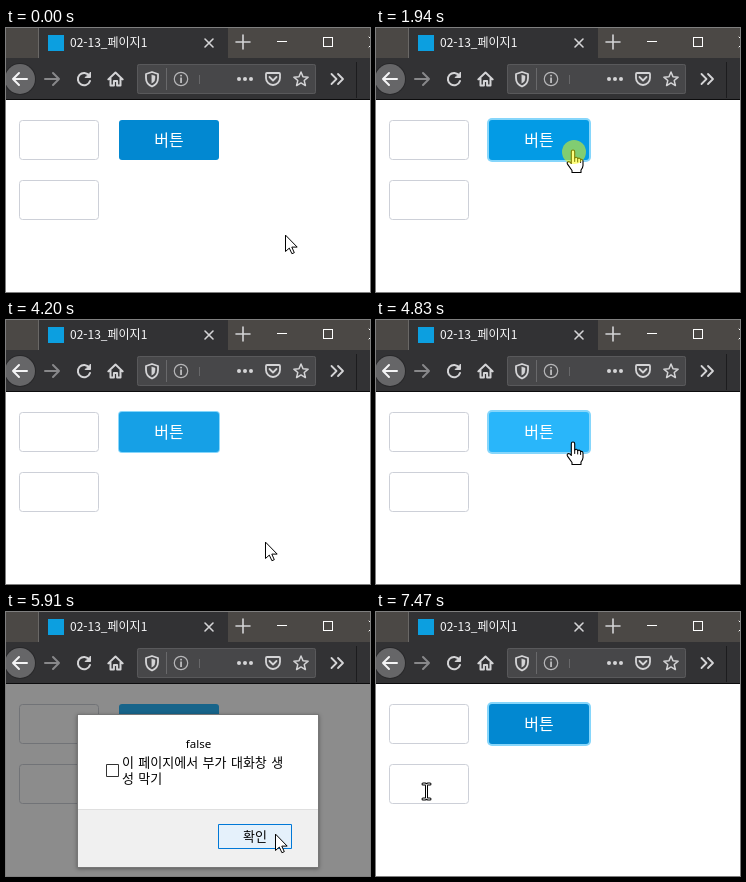
An HTML page with a canvas for the animation above (8 s loop, 364x264 px).

```html
<!DOCTYPE html>
<html lang="ko">
<head>
<meta charset="utf-8">
<style>
html, body { margin: 0; width: 100%; height: 100%; overflow: hidden; background: #fff; }
canvas { display: block; width: 364px; height: 264px; }
</style>
</head>
<body>
<canvas id="stage"></canvas>
<script>
const W = 364, H = 264, LOOP = 8000;
const canvas = document.getElementById('stage');
const dpr = window.devicePixelRatio || 1;
canvas.width = W * dpr;
canvas.height = H * dpr;
const c = canvas.getContext('2d');
const KR = '"Noto Sans CJK KR", "Noto Sans CJK", sans-serif';
const LATIN = '"Noto Sans", sans-serif';

const MOVES = [
  [1000, 1350, 279, 207, 197, 124],
  [2480, 2710, 197, 124, 259, 222],
  [4200, 4780, 259, 222, 197, 124],
  [5370, 5900, 197, 124, 269, 222],
  [7010, 7460, 269, 222, 50.5, 179.5]
];
const DIALOGS = [
  { from: 2020, to: 4130, press: 3960, x: 72, y: 105, w: 240, h: 144, foot: 190, bx: 211, by: 205, text: 153 },
  { from: 5290, to: 6940, press: 6770, x: 71, y: 102, w: 242, h: 154, foot: 197, bx: 212, by: 212, text: 136, extra: true }
];
const CLICKS = [[1870, 2020], [3960, 4130], [5140, 5290], [6770, 6940]];

const ramp = (t, a, b) => Math.max(0, Math.min(1, (t - a) / (b - a)));
const ease = u => u * u * (3 - 2 * u);
const within = (t, [a, b]) => t >= a && t < b;
const mix = (a, b, u) => a.map((v, i) => v + (b[i] - v) * u);
const rgb = a => `rgb(${a.map(Math.round)})`;
const inside = (p, x, y, w, h) => p.x >= x && p.x < x + w && p.y >= y && p.y < y + h;

function rect(x, y, w, h, color) {
  c.fillStyle = color;
  c.fillRect(x, y, w, h);
}
function box(x, y, w, h, r, fill, stroke) {
  c.beginPath();
  c.roundRect(x, y, w, h, r);
  c.fillStyle = fill;
  c.fill();
  if (!stroke) return;
  c.beginPath();
  c.roundRect(x + .5, y + .5, w - 1, h - 1, r);
  c.strokeStyle = stroke;
  c.lineWidth = 1;
  c.stroke();
}
function text(s, x, y, size, color, align = 'left', family = KR) {
  c.font = `${size}px ${family}`;
  c.fillStyle = color;
  c.textAlign = align;
  c.fillText(s, x, y);
}
function icon(d, x, y, color, width, fill) {
  c.save();
  c.translate(x, y);
  const p = new Path2D(d);
  if (fill) {
    c.fillStyle = fill;
    c.fill(p);
  }
  c.strokeStyle = color;
  c.lineWidth = width;
  c.lineJoin = c.lineCap = 'round';
  c.stroke(p);
  c.restore();
}
function disc(x, y, r, color) {
  c.beginPath();
  c.arc(x, y, r, 0, Math.PI * 2);
  c.fillStyle = color;
  c.fill();
}

function browser() {
  rect(0, 0, W, 30, '#4b4845');
  rect(32, 0, 190, 30, '#323234');
  rect(32, 0, 1, 30, '#6a6866');
  rect(0, 30, W, 42, '#323234');
  rect(0, 71, W, 1, '#0c0c0d');
  rect(42, 7, 16, 16, '#0c9fe0');
  text('02-13_페이지1', 64, 19, 12, '#f9f9fa');

  const light = '#d4d4d6';
  icon('M-4 -4L4 4M4 -4L-4 4', 203, 15, light, 1.6);
  icon('M-7 0H7M0 -7V7', 237, 14, light, 1.6);
  rect(271, 13, 10, 1, '#fff');
  c.strokeStyle = '#fff';
  c.lineWidth = 1;
  c.strokeRect(317.5, 9.5, 9, 9);
  icon('M-5 -5L5 5M5 -5L-5 5', 368, 14, '#fff', 1);

  disc(14, 51, 16, '#28282a');
  disc(14, 51, 15, '#666668');
  icon('M7 0H-7M-1 -6L-7 0L-1 6', 14, 51, '#f4f4f5', 2);
  icon('M-7 0H7M1 -6L7 0L1 6', 46, 51, '#88888a', 2);
  icon('M5.2 -3.4A6.2 6.2 0 1 0 6 2', 78, 51, light, 2);
  icon('M6.5 -6.5V-1.5H1.5Z', 78, 51, light, 1, light);
  icon('M-7.2 .4L0 -6.5L7.2 .4M-5 -.5V6.5H-1.6V2H1.6V6.5H5V-.5', 109.5, 51, light, 2);

  box(131, 36, 179, 30, 2, '#474749', '#59595b');
  icon('M0 -7L6 -5V-1Q6 5 0 7.5Q-6 5 -6 -1V-5Z', 146, 51, light, 1.8);
  icon('M0 -4L3 -3V-1Q3 3 0 4Z', 146, 51, light, .5, light);
  rect(160, 40, 1, 22, '#69696b');
  c.beginPath();
  c.arc(175, 51, 6.7, 0, Math.PI * 2);
  c.strokeStyle = '#b6b6b8';
  c.lineWidth = 1.2;
  c.stroke();
  rect(174.3, 49.5, 1.5, 5.5, light);
  rect(174.3, 46.8, 1.5, 1.6, light);
  rect(193, 47, 1, 9, '#68686a');
  for (const x of [233, 239, 245]) disc(x, 51, 2, light);
  icon('M-6 -6H6Q7 -6 7 -5V-1A7 7 0 0 1 -7 -1V-5Q-7 -6 -6 -6ZM-3.5 -2L0 1.5L3.5 -2', 267, 51, light, 1.8);

  let star = '';
  for (let i = 0; i < 10; i++) {
    const r = i % 2 ? 3.4 : 7.5, a = i * Math.PI / 5;
    star += (i ? 'L' : 'M') + r * Math.sin(a) + ' ' + -r * Math.cos(a);
  }
  icon(star + 'Z', 295, 51.5, light, 1.5);
  icon('M-5.5 -5L-.5 0L-5.5 5M1 -5L6 0L1 5', 331, 51, light, 1.8);
  rect(350, 34, 1, 36, '#1c1c1e');
}

function page(t, dialog) {
  rect(0, 72, W, H - 72, '#fff');
  box(13, 92, 80, 40, 3, '#fff', '#cdd0d8');
  box(13, 152, 80, 40, 3, '#fff', '#cdd0d8');

  const hover = ramp(t, 1240, 1400) - ramp(t, 4120, 4290) + ramp(t, 4660, 4820) - ramp(t, 6930, 7100);
  const ring = dialog ? 0 :
    t < 2020 ? ramp(t, 1850, 1930) :
    t < 5290 ? ramp(t, 4120, 4290) : ramp(t, 6930, 7100);
  const press = t < 4000 ? ramp(t, 1840, 1930) - ramp(t, 2010, 2020)
    : ramp(t, 5110, 5200) - ramp(t, 5280, 5290);
  if (ring) {
    const g = 2 * ring;
    box(113 - g, 92 - g, 100 + 2 * g, 40 + 2 * g, 3 + g, '#86d6fb');
  }
  const tone = mix(mix([2, 136, 209], [41, 182, 250], hover), [3, 155, 229], press);
  box(113, 92, 100, 40, 3, rgb(tone));
  text('버튼', 163, 118, 16, '#fff', 'center');
}

function alertBox(d, t, p) {
  rect(0, 72, W, H - 72, 'rgba(0,0,0,.45)');
  c.save();
  c.shadowColor = 'rgba(0,0,0,.35)';
  c.shadowBlur = 4;
  c.shadowOffsetY = 1;
  rect(d.x, d.y, d.w, d.h, '#777');
  c.restore();
  rect(d.x + 1, d.y + 1, d.w - 2, d.h - 2, '#fff');
  rect(d.x + 1, d.foot, d.w - 2, d.y + d.h - 1 - d.foot, '#f0f0f0');
  rect(d.x + 1, d.foot, d.w - 2, 1, '#dfdfdf');
  text('false', 192.5, d.text, 11.5, '#000', 'center', LATIN);
  if (d.extra) {
    box(100, 152, 13, 13, 0, '#fff', '#333');
    c.wordSpacing = '1.5px';
    text('이 페이지에서 부가 대화창 생', 116, 155, 13, '#000');
    text('성 막기', 116, 171, 13, '#000');
    c.wordSpacing = '0px';
  }
  const over = inside(p, d.bx, d.by, 74, 25);
  const down = t >= d.press;
  box(d.bx, d.by, 74, 25, 0, down ? '#cce4f7' : over ? '#e5f1fb' : '#e1e1e1', down ? '#005499' : '#0078d7');
  if (!over) {
    c.strokeStyle = '#0078d7';
    c.strokeRect(d.bx + 1.5, d.by + 1.5, 71, 22);
  }
  text('확인', d.bx + 37, d.by + 17, 13, '#000', 'center');
}

function cursor(p, dialog) {
  const { x, y } = p;
  const field = inside(p, 13, 92, 80, 40) || inside(p, 13, 152, 80, 40);
  if (!dialog && inside(p, 113, 92, 100, 40)) {
    icon('M-1.7 12V.2A1.7 1.7 0 0 1 1.7 .2V6.5Q3.5 4.8 4.7 7Q6.8 5.8 7.6 8Q10 7.4 10 10V14Q10 16 8 18.5V21H-1V19L-5.5 12.6Q-6.5 10.5 -4.5 10Q-3 10 -1.7 12Z', x, y - .5, '#000', 1.1, '#fff');
    icon('M1.7 6.5V10M4.7 7V10.5M7.6 8V11', x, y - .5, '#000', 1);
  } else if (!dialog && field) {
    const beam = 'M-3.5 -7.5H-1L0 -6.5L1 -7.5H3.5M0 -6.5V6.5M-3.5 7.5H-1L0 6.5L1 7.5H3.5';
    icon(beam, x, y, '#000', 3);
    icon(beam, x, y, '#fff', 1);
  } else {
    icon('M0 0V16L3.8 12.6L6.4 18.2L8.8 17.2L6.3 11.6H11.3Z', x + .5, y + .5, '#000', 1, '#fff');
  }
}

function pointer(t) {
  let p = { x: 279, y: 207 };
  for (const [a, b, x0, y0, x1, y1] of MOVES) {
    if (t < a) break;
    const u = ease(ramp(t, a, b));
    p = { x: x0 + (x1 - x0) * u, y: y0 + (y1 - y0) * u };
  }
  return p;
}

function draw(t) {
  const p = pointer(t);
  const dialog = DIALOGS.find(d => within(t, [d.from, d.to]));
  c.setTransform(dpr, 0, 0, dpr, 0, 0);
  browser();
  page(t, dialog);
  if (dialog) alertBox(dialog, t, p);
  cursor(p, dialog);
  if (CLICKS.some(k => within(t, k))) disc(p.x + 1, p.y, 12, 'rgba(255,255,0,.5)');
}

const start = performance.now();
function tick() {
  draw((performance.now() - start) % LOOP);
  requestAnimationFrame(tick);
}
tick();
</script>
</body>
</html>
```
